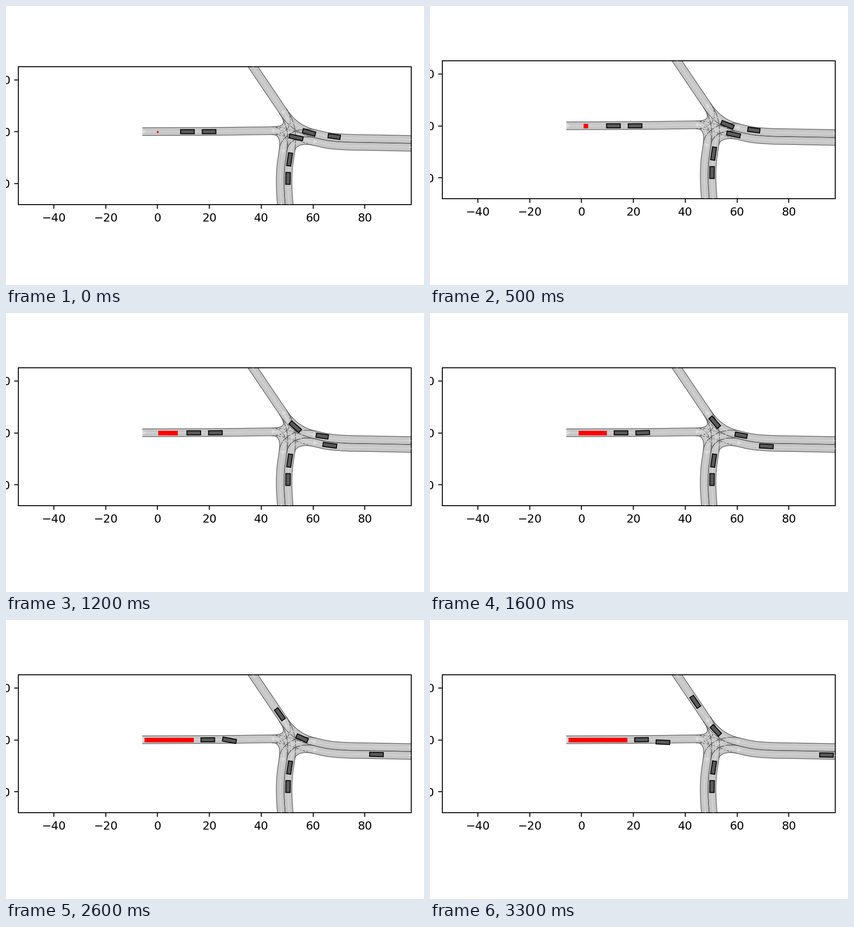
Recreate the animation shown at these times as a matplotlib script. Size 917x611 px, loop 3400 ms.

```python
import numpy as np
import matplotlib.pyplot as plt
from matplotlib.animation import FuncAnimation
from matplotlib.patches import Polygon, Rectangle

W, H, DPI = 917, 611, 128
PX = 72 / DPI                      # one pixel in points
FRAMES = 34
LEFT, RIGHT, TOP, BOTTOM = 27, 889, 120.2, 421.9
X0, Y0, UNIT = 332.9, 262.5, 5.685   # pixel place of (0, 0), pixels per metre
ROAD, EDGE, MID = "#c7c7c7", "#555555", "#dddddd"

plt.rcParams["font.family"] = "DejaVu Sans"
fig = plt.figure(figsize=(W / DPI, H / DPI), dpi=DPI, facecolor="white")
ax = fig.add_axes([0.1, 0.1, 0.8, 0.8])
ax.set_xlim(LEFT + 0.5, RIGHT + 0.5)
ax.set_ylim(BOTTOM, TOP)


def label(v):
    return str(v).replace("-", "\u2212")


xt, yt = range(-40, 81, 20), (-20, 0, 20)
ax.set_xticks([X0 + UNIT * v for v in xt], [label(v) for v in xt])
ax.set_yticks([Y0 - UNIT * v for v in yt], [label(v) for v in yt])
ax.tick_params(length=8.75 * PX, width=2 * PX, labelsize=25 * PX)
ax.tick_params(axis="x", pad=9.6 * PX)
ax.tick_params(axis="y", pad=8.75 * PX)
for spine in ax.spines.values():
    spine.set_linewidth(2 * PX)


def arc(p):
    """Distance travelled at each point of a curve."""
    return np.r_[0, np.cumsum(np.hypot(*np.diff(p, axis=0).T))]


def heading(p):
    d = np.gradient(p, axis=0)
    return d / np.hypot(*d.T)[:, None]


def through(*pts):
    """Smooth curve through a few points."""
    p = np.array(pts, float)
    d = arc(p)
    m = np.gradient(p, d, axis=0)
    t = np.linspace(0, d[-1], 200)
    i = np.clip(np.searchsorted(d, t, side="right") - 1, 0, len(d) - 2)
    h = (d[i + 1] - d[i])[:, None]
    s = (t - d[i])[:, None] / h
    return ((1 + 2 * s) * (1 - s) ** 2 * p[i] + s * (1 - s) ** 2 * h * m[i]
            + s * s * (3 - 2 * s) * p[i + 1] + s * s * (s - 1) * h * m[i + 1])


def beside(p, dist):
    """Curve running parallel, dist to the right."""
    return p + dist * heading(p)[:, ::-1] * (-1, 1)


def lane(left, right, styles="--"):
    ax.add_patch(Polygon(np.vstack([left, right[::-1]]), fc=ROAD, ec="none", zorder=1))
    for side, style in zip((left, right), styles):
        ax.plot(*side.T, color=EDGE, lw=1.3 * PX, zorder=2,
                ls="-" if style == "-" else (0, (4, 2)))
    ax.plot(*((left + right) / 2).T, color=MID, lw=1.2 * PX, zorder=3)


def arrow(p, u):
    u = np.array(u) / np.hypot(*u)
    n = 4.7 * np.array([-u[1], u[0]])
    ax.add_patch(Polygon([p + n, p - n, p + 10 * u], fc=MID, ec="none", zorder=3))


# each road follows one guide line, heading away from the junction except west
west = through((300, 262.3), (430, 262), (584, 260.2))
nw = through((608.2, 217.6), (539.1, 115.5))
east = through((677, 275.3), (705, 281.5), (745, 285.1), (790, 286.1), (895, 288.1))
south = through((617, 303), (611.5, 345), (610.8, 385), (613.3, 425))
WIDE = 17.1

w_left, w_right = beside(west, -WIDE / 2), beside(west, WIDE / 2)
n_left, n_right = beside(nw, -9.1), beside(nw, 9.1)
e_top, e_low = beside(east, -WIDE), beside(east, WIDE)
s_left, s_right = beside(south, WIDE), beside(south, -WIDE)
for pair in ((w_left, w_right), (n_left, n_right), (e_top, east),
             (east, e_low), (s_left, south), (south, s_right)):
    lane(*pair)

# gates of the junction: left corner, right corner, heading
FROM_W = (w_left[-1], w_right[-1], heading(west)[-1])
FROM_E = (east[0], e_top[0], -heading(east)[0])
FROM_S = (south[0], s_right[0], -heading(south)[0])
TO_NW = (n_left[0], n_right[0], heading(nw)[0])
TO_E = (east[0], e_low[0], heading(east)[0])
TO_S = (south[0], s_left[0], heading(south)[0])


def connect(a, b, bends=(0.38, 0.38), styles="--"):
    s = np.linspace(0, 1, 60)[:, None]
    sides = []
    for p, q, k in zip(a, b, bends):
        r = k * np.hypot(*(q - p))
        sides.append((1 - s) ** 3 * p + 3 * s * (1 - s) ** 2 * (p + r * a[2])
                     + 3 * s * s * (1 - s) * (q - r * b[2]) + s ** 3 * q)
    lane(*sides, styles)


# in styles "-" is a solid side and ":" a broken one
connect(FROM_W, TO_NW, (0.8, 0.55), "-:")
connect(FROM_W, TO_E, styles="::")
connect(FROM_W, TO_S, (0.4, 0.47), ":-")
connect(FROM_E, TO_NW)
connect(FROM_E, TO_S)
connect(FROM_S, TO_NW)
connect(FROM_S, TO_E)

arrow(west[0], FROM_W[2])
arrow(west[-1], FROM_W[2])
arrow(nw[0] - 5 * TO_NW[2], TO_NW[2])
arrow((south[0] + s_left[0]) / 2, TO_S[2])
arrow((east[0] + e_low[0]) / 2, TO_E[2])
arrow((east[0] + e_top[0]) / 2, FROM_E[2])

# traffic: every moving car speeds up at the same rate along its route
ACCEL = 0.04
ahead = through((390, 262.4), (465, 262.2), (477, 262), (490, 263.3),
                (505, 267), (512, 267.6), (525, 266.9))
leave = through((637, 275), (685, 285.2), (715, 290.2), (738.5, 291.8),
                (775, 293.3), (885, 296.1))
cross = through((722, 273.2), (683, 267.7), (665, 264.1), (645, 256.4),
                (626.5, 240.8), (613.5, 223.4), (570, 161.2))
wait = beside(south, -WIDE / 2)

# route, start along it, first speed, length, width
CARS = [
    (ahead, 8.5, 0.68, 30, 9),
    (ahead, 56, 0.68, 30, 9),
    (leave, 0, 5.8, 30, 9),
    (cross, 57.5, 2.37, 28.5, 9.5),
    (cross, 1.5, 1.73, 26.5, 9.5),
    (wait, 19.3, 0, 28.5, 9),
    (wait, 61, 0, 26, 9.8),
]

area = ax.add_patch(Rectangle((0, 0), 1, 1, fc="red", ec="none", zorder=5))
bodies = [ax.add_patch(Polygon(np.zeros((4, 2)), fc="#5a5a5a", ec="black",
                               lw=2 * PX, zorder=6)) for _ in CARS]


def along(route, s):
    d = arc(route)
    return [np.array([np.interp(s, d, c) for c in v.T])
            for v in (route, heading(route))]


def update(n):
    # the view settles higher after the first step
    dy = 12.8 if n == 0 else 0
    ax.set_position([LEFT / W, 1 - (BOTTOM + dy) / H,
                     (RIGHT - LEFT) / W, (BOTTOM - TOP) / H])
    places = []
    for body, (route, start, speed, length, width) in zip(bodies, CARS):
        p, u = along(route, start + speed * n + ACCEL * n * n * (speed > 0))
        a, b = u * length / 2, np.array([-u[1], u[0]]) * width / 2
        body.set_xy([p - a - b, p + a - b, p + a + b, p - a + b])
        places.append(p)

    # reachable area spreads both ways, held by the lane and the car ahead
    mid, grow = 333 + 1.9 * n, 2 + 0.136 * n * n
    left = max(mid - grow, 304.8)
    right = min(mid + grow, places[0][0] - 31)
    tall = min(2 * grow, 9.7)
    area.set_bounds(left, 263.2 - tall / 2, right - left, tall)
    return [area, *bodies]


anim = FuncAnimation(fig, update, frames=FRAMES, interval=100, repeat=True,
                     repeat_delay=0, blit=False)
plt.show()
```
